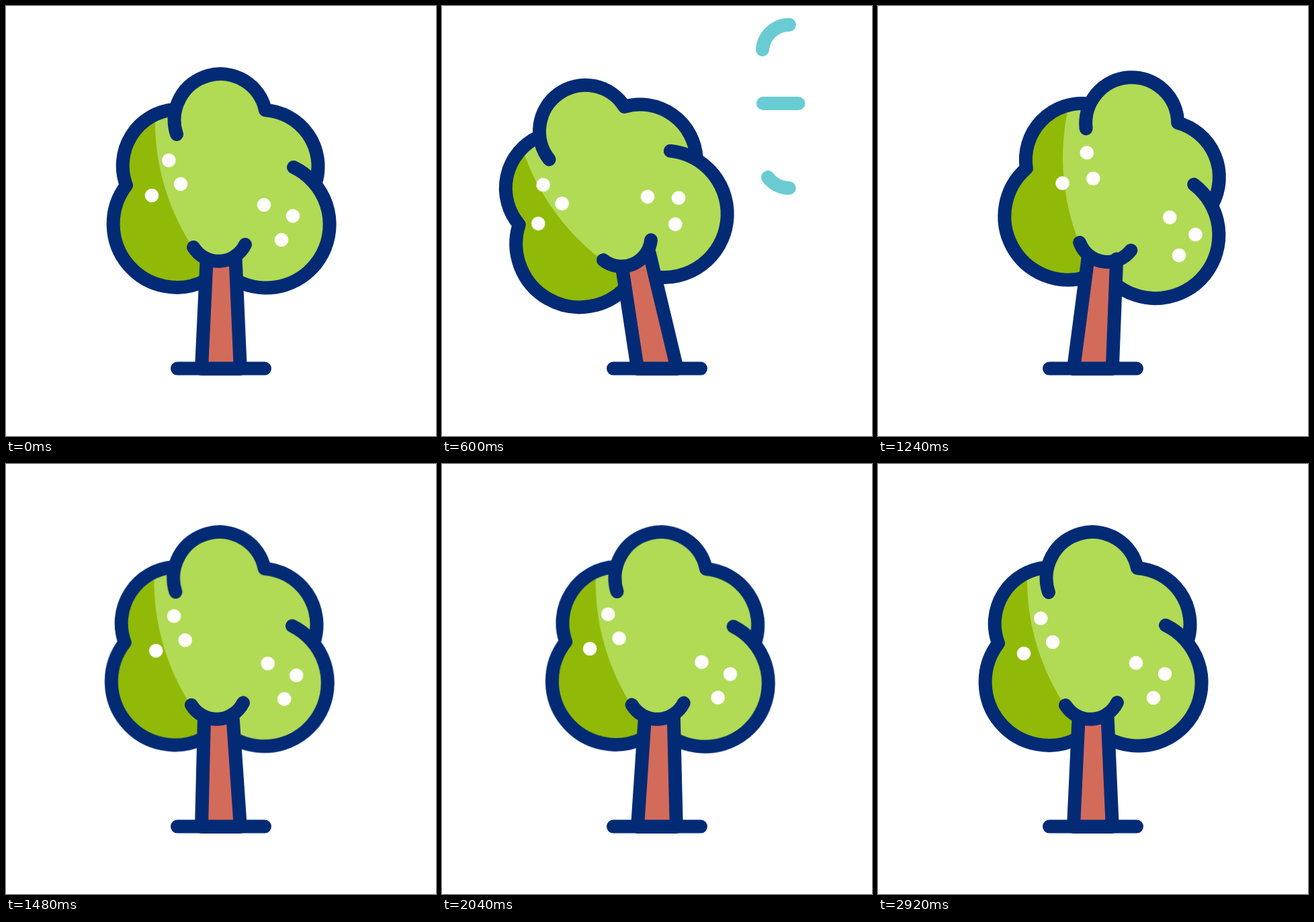
Write an HTML page without scripts that moves like this. It is 640x640 px and loops after 3 s.

```html
<!DOCTYPE html>
<html lang="en">
<head>
<meta charset="utf-8">
<title>Tree in the wind</title>
<style>
  @property --tip { syntax: "<number>"; inherits: true; initial-value: 0; }
  @property --turn { syntax: "<angle>"; inherits: true; initial-value: 0deg; }

  html, body { margin: 0; height: 100%; overflow: hidden; background: #fff; }
  svg {
    --swing: cubic-bezier(.37, 0, .63, 1);
    display: block; width: 100vw; height: 100vh;
    animation: tip 3s var(--swing) infinite, turn 3s var(--swing) infinite;
  }
  .line { fill: none; stroke: #032b75; stroke-width: 20; stroke-linecap: round; stroke-linejoin: round; }

  /* The crown rides on the trunk tip and turns a little later than it. */
  .crown {
    transform-origin: 320px 391px;
    transform:
      translate(calc(var(--tip) * 1px), calc(var(--tip) * var(--tip) * .0035px))
      rotate(var(--turn));
  }
  .trunk { fill: #d36b5b; animation: lean 3s var(--swing) infinite; }

  /* The dots trail behind the crown. */
  .drift { animation: drift 3s var(--swing) infinite; }
  .bob { animation: bob 3s var(--swing) infinite; }
  .spin { transform-origin: 323px 289px; animation: spin 3s var(--swing) infinite; }

  .wind { fill: none; stroke: #68ccd2; stroke-width: 20; stroke-linecap: round; }
  .wind path { animation: blow 3s ease-out infinite; }
  .wind .straight { animation-delay: -40ms; }

  @keyframes tip {
    0%, 4%, 90%, 100% { --tip: 0; }
    19.67% { --tip: -30.7; }
    38% { --tip: 16.3; }
    54.67% { --tip: -9.2; }
    72% { --tip: 4.8; }
  }
  @keyframes lean {
    0%, 4%, 90%, 100% { d: path("M298.6 378L291 540L348.8 540L341.4 372"); }
    19.67% { d: path("M268 389L291 540L349.9 540L308.8 368"); }
    38% { d: path("M315.2 374L291 540L348.8 540L357.7 377"); }
    54.67% { d: path("M289 381L291 540L348.8 540L331.2 371"); }
    72% { d: path("M303.7 377L291 540L348.8 540L346.6 373"); }
  }
  @keyframes turn {
    0%, 5.33%, 96.67%, 100% { --turn: 0deg; }
    21.5% { --turn: -20.2deg; }
    40.5% { --turn: 11.8deg; }
    56% { --turn: -6.6deg; }
    73% { --turn: 2.8deg; }
  }
  @keyframes drift {
    0%, 4%, 96.67%, 100% { transform: translateX(0); }
    23.33% { transform: translateX(-12.5px); }
    42.67% { transform: translateX(19.3px); }
    60% { transform: translateX(-14.2px); }
    78.67% { transform: translateX(17px); }
  }
  @keyframes bob {
    0%, 4%, 96.67%, 100% { transform: translateY(0); }
    20% { transform: translateY(-.7px); }
    31% { transform: translateY(-4.5px); }
    42% { transform: translateY(1.8px); }
    59% { transform: translateY(-5.3px); }
    80% { transform: translateY(-.6px); }
  }
  @keyframes spin {
    0%, 4%, 96.67%, 100% { transform: rotate(0); }
    20%, 60% { transform: rotate(1.2deg); }
    80% { transform: rotate(.7deg); }
  }
  @keyframes blow {
    0%, 5% { stroke-dasharray: 0 200; stroke-dashoffset: 0; opacity: 0; }
    5.01% { stroke-dasharray: 0 200; stroke-dashoffset: 0; opacity: 1; }
    13% { stroke-dasharray: 85 200; stroke-dashoffset: -15; }
    20% { stroke-dasharray: 35 200; stroke-dashoffset: -65; }
    23.59% { stroke-dasharray: 35 200; stroke-dashoffset: -65; opacity: 1; }
    23.6%, 100% { stroke-dasharray: 35 200; stroke-dashoffset: -65; opacity: 0; }
  }
</style>
</head>
<body>
<svg viewBox="0 0 640 640">
  <g class="wind">
    <path pathLength="100" d="M628 28H517A40 40 0 0 0 477 65"/>
    <path pathLength="100" class="straight" d="M628 145H478"/>
    <path pathLength="100" d="M585 271H517A40 40 0 0 1 485 255"/>
  </g>

  <g class="crown">
    <path fill="#b1da55" d="M250 154A68.5 68.5 0 0 1 386 155A84 84 0 0 1 461 267A94.5 94.5 0 0 1 342 408H298A94.5 94.5 0 0 1 179 267A84 84 0 0 1 250 154Z"/>
    <path fill="#91b907" d="M222 163A342 342 0 0 0 305 395L298 408A94.5 94.5 0 0 1 179 267A84 84 0 0 1 222 163Z"/>
    <g class="line">
      <path d="M250 154A84 84 0 0 0 179 267A94.5 94.5 0 0 0 298 408"/>
      <path d="M254 191A68.5 68.5 0 1 1 386 155A84 84 0 0 1 461 263"/>
      <path d="M428 240A94.4 94.4 0 1 1 342 408"/>
    </g>
  </g>

  <path class="line trunk" d="M298.6 378L291 540L348.8 540L341.4 372"/>
  <path class="line" d="M255 539.6H385"/>
  <path class="line crown" d="M279 359A44 44 0 0 0 356 355"/>

  <g class="drift"><g class="bob"><g class="crown"><g class="spin" fill="#fff">
    <circle cx="242.3" cy="229.7" r="10.3"/>
    <circle cx="260" cy="265" r="10.3"/>
    <circle cx="217" cy="282" r="10.3"/>
    <circle cx="384" cy="296" r="10.3"/>
    <circle cx="427" cy="312.5" r="10.3"/>
    <circle cx="410" cy="348" r="10.3"/>
  </g></g></g></g>
</svg>
</body>
</html>
```
